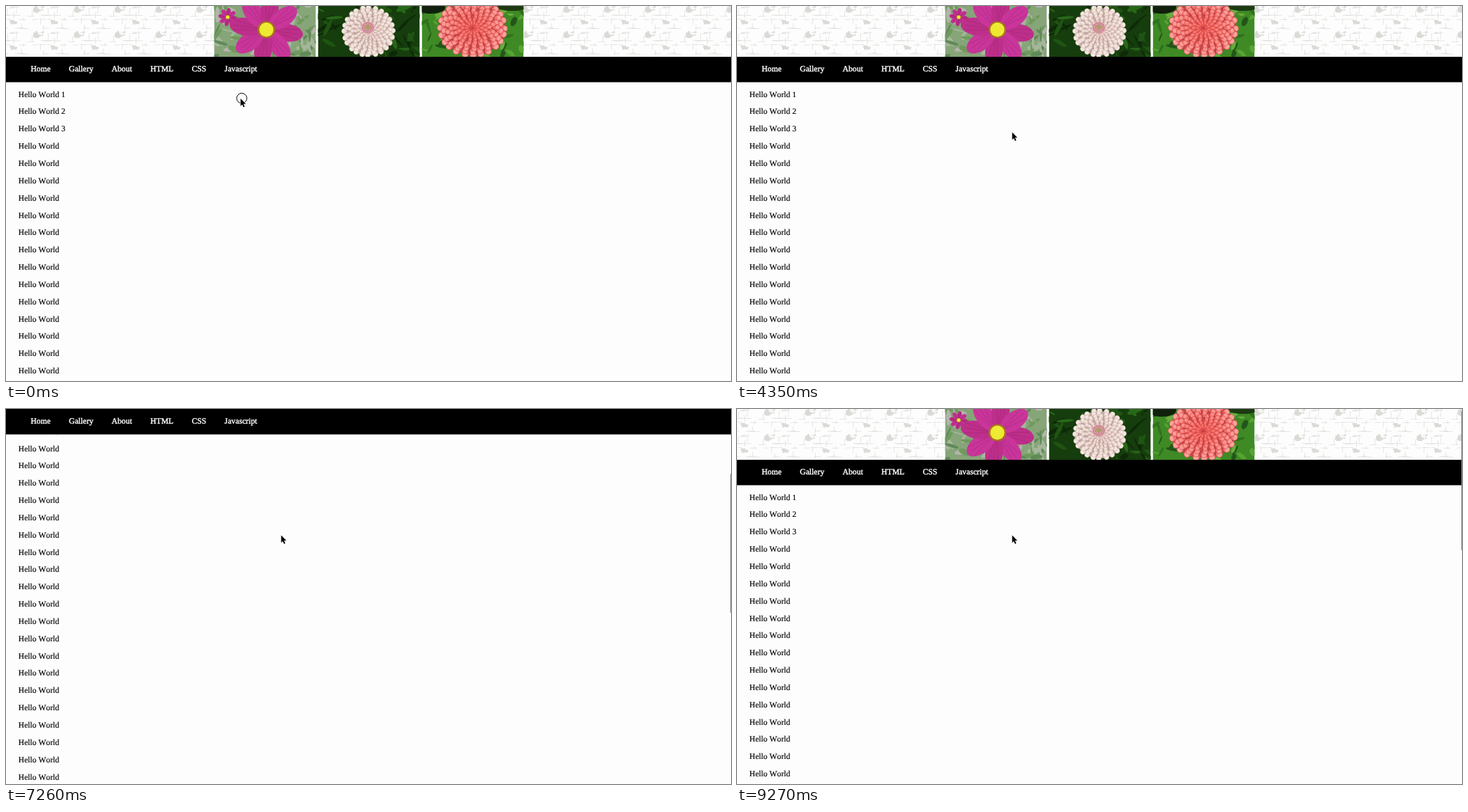
Recreate the animation shown at these times as an HTML page with a canvas. Size 1040 by 539 pixels, loop 9840 ms.

```html
<!DOCTYPE html>
<html lang="en">
<head>
<meta charset="utf-8">
<title>Sticky navigation</title>
<style>
html, body { margin: 0; width: 100%; height: 100%; overflow: hidden; background: #fdfdfd; }
body { position: relative; font: 11.7px "Liberation Serif", "Times New Roman", serif; font-kerning: none;
  text-rendering: geometricPrecision; -webkit-text-stroke: .15px; }
#page, #nav, #bar, #cursor, canvas { position: absolute; left: 0; }
canvas { top: 0; }
#page { top: 0; width: 1040px; }
#lines { position: absolute; top: 115.6px; left: 17.7px; line-height: 24.85px; white-space: nowrap; }
#lines div { height: 24.85px; }
#nav { box-sizing: border-box; width: 1040px; height: 37px; padding-left: 23.7px; color: #fff;
  background: linear-gradient(#000 36px, #0008 0); line-height: 36.5px; white-space: nowrap; -webkit-text-stroke: .4px; }
#nav a { display: inline-block; padding: 0 11.7px; height: 37px; vertical-align: top; }
#nav a.on { background: linear-gradient(#439a8a 36px, #439a8a88 0); }
#bar { left: 1038.6px; width: 2px; height: 200px; background: #858585; border-radius: 1px; }
#cursor { top: 0; pointer-events: none; }
</style>
</head>
<body>
<div id="page"><canvas id="head" width="1040" height="73"></canvas><div id="lines"></div></div>
<div id="nav"></div>
<div id="bar"></div>
<svg id="cursor" width="1040" height="539">
  <circle id="ring" cx="338.2" cy="132.6" r="7.3" fill="none" stroke="#000"/>
  <path id="arrow" d="M0 0V10.7L2.4 8.4L4.2 12.4L5.9 11.6L4.1 7.7H7.5Z" stroke="#fff" stroke-width="1.4" paint-order="stroke"/>
  <path id="hand" fill="#fff" stroke="#000" stroke-width=".9" d="M-1.3 7V1A1.2 1.2 0 0 1 1.1 1V4.8Q2.4 3.8 3.1 5Q4.4 4.4 5 5.6Q6.6 5 6.8 6.6V9Q6.6 10.5 5.8 11.5V12.8H.1V12Q-1.3 10.5-3.2 8Q-4 6.5-2.8 6.3Q-2 6.2-1.3 7.3ZM1.1 4.8V7M3.1 5V7M5 5.6V7"/>
</svg>
<script>
const $ = id => document.getElementById(id);
const LOOP = 9840, HEAD = 73;

let seed = 7;
const rnd = (a = 1, b = 0) => {
  seed = (seed * 16807) % 2147483647;
  return b + (a - b) * seed / 2147483647;
};

const c = $('head').getContext('2d');
function oval(x, y, rx, ry, fill, turn = 0) {
  c.fillStyle = fill;
  c.beginPath();
  c.ellipse(x, y, rx, ry, turn, 0, 7);
  c.fill();
}

// Brick wallpaper: two rough patches and broken mortar lines per tile
function wallpaper() {
  const parts = [];
  for (let i = 0; i < 14; i++) {
    parts.push([rnd(-6, 6), rnd(-4, 4), rnd(6, 2), rnd(4, 2), 47, 4.5]);
    if (i < 9) parts.push([rnd(-6, 6), rnd(-2.5, 2.5), rnd(5, 2), rnd(4, 2), 12, 23.5]);
  }
  const dashes = Array.from({ length: 26 }, (_, i) =>
    i % 3 ? [rnd(54), [1.5, 13.5, 19.5, 31.5][i % 4] + rnd(-1, 1), rnd(12, 4), .8]
          : [rnd(54), rnd(28), .8, rnd(9, 4)]);
  for (let x = -58.5; x < 1040; x += 58.5)
    for (let y = -36.5; y < HEAD; y += 36.5) {
      c.fillStyle = '#dadad6';
      for (const [dx, dy, w, h, ox, oy] of parts) c.fillRect(x + ox + dx - w / 2, y + oy + dy - h / 2, w, h);
      c.fillStyle = '#dededb';
      for (const [dx, dy, w, h] of dashes) c.fillRect(x + dx, y + dy, w, h);
    }
}

function photo(x, colors, leaves, draw) {
  c.save();
  c.beginPath();
  c.rect(x, 0, 146, HEAD);
  c.clip();
  c.fillStyle = colors[0];
  c.fillRect(x, 0, 146, HEAD);
  for (let i = 0; i < leaves; i++)
    oval(x + rnd(146), rnd(HEAD), rnd(14, 4), rnd(4, 1), colors[i % colors.length], rnd(6.3));
  draw();
  c.restore();
}

function cosmos(x, y, r) {
  for (let i = 0; i < 8; i++) {
    const a = i * Math.PI / 4 + .15, px = Math.cos(a), py = Math.sin(a);
    oval(x + px * r * .58, y + py * r * .56, r * .46, r * .25, i % 2 ? '#c9359a' : '#bd2f8a', a);
    c.strokeStyle = '#96246c77';
    for (let k = -1; k < 2; k++) {
      c.beginPath();
      c.moveTo(x, y);
      c.lineTo(x + Math.cos(a + k * .16) * r * .92, y + Math.sin(a + k * .16) * r * .9);
      c.stroke();
    }
  }
  oval(x, y, r * .25, r * .24, '#a8701f');
  oval(x, y, r * .2, r * .2, '#eeea32');
}

// Rings of petals from the rim inwards, each with a shaded base and a bright tip
function dahlia(x, y, rx, ry, rings, shade, body, tip) {
  for (let i = 0; i < rings; i++) {
    const k = 1 - i / rings, n = Math.round(11 + 13 * k);
    for (let j = 0; j < n; j++) {
      const a = (j + i % 2 / 2 + rnd(-.15, .15)) * 2 * Math.PI / n, d = k * .89;
      const dx = Math.cos(a), dy = Math.sin(a);
      const px = x + dx * rx * d, py = y + dy * ry * d;
      const w = rx * .12, h = rx * (.03 + k * .085);
      oval(px, py, w, h, shade, a);
      oval(px + dx, py + dy, w * .85, h * .8, body(k), a);
      oval(px + dx * w * .45, py + dy * w * .45, w * .4, h * .6, tip(k), a);
    }
  }
}

wallpaper();
c.fillStyle = '#fff';
c.fillRect(298, 0, 445, HEAD);
photo(298.5, ['#86a578', '#6f9a5d', '#a5b69b', '#5f8a58', '#b3b4ac'], 110, () => {
  cosmos(318, 16, 13);
  cosmos(373.5, 34, 51);
});
photo(447.5, ['#163d0d', '#1f5412', '#0d2a08', '#286819'], 70, () => {
  oval(520, 37, 36, 34, '#c9b3ab');
  dahlia(520, 36.5, 38, 37, 8, '#b79c94', k => `hsl(${16 * k + 5} 38% ${80 + 6 * k}%)`, k => `hsl(15 45% ${87 + 6 * k}%)`);
  oval(519, 31, 9, 8, '#d795a0');
  dahlia(519, 31, 9, 8, 3, '#b9707f', () => '#e0a5ab', () => '#eec3c0');
  oval(519, 30.5, 3.5, 3, '#a9a060');
});
photo(596.5, ['#3f8a25', '#2f711c', '#57a334', '#22551a', '#67ad3d'], 70, () => {
  oval(610, 2, 20, 9, '#10200c');
  oval(726, 0, 24, 7, '#1c3a12');
  oval(669, 32, 46, 38, '#cf4f4f');
  dahlia(669, 31.5, 50, 42, 8, '#bd3d43', k => `hsl(2 82% ${62 + 8 * k}%)`, k => `hsl(4 90% ${68 + 12 * k}%)`);
});

$('lines').innerHTML = Array.from({ length: 50 }, (_, i) => `<div>Hello World ${i < 3 ? i + 1 : ''}</div>`).join('');
$('nav').innerHTML = ['Home', 'Gallery', 'About', 'HTML', 'CSS', 'Javascript'].map(s => `<a>${s}</a>`).join(' ');
const links = [...document.querySelectorAll('#nav a')];

// Pointer path: time, x, y
const path = [[0, 336.5, 133], [900, 336.5, 133], [1550, 338.2, 100.5], [1960, 338.2, 100.5],
  [2480, 276, 99], [2750, 276, 99], [3350, 315, 98], [3820, 390, 99], [4180, 390, 99],
  [4350, 394.7, 181.5], [LOOP, 394.7, 181.5]];

// Scroll position jumps at each time
const scrolls = [[0, 0], [5010, 4], [5070, 10], [5250, 25.5], [5420, 43], [5600, 60], [5780, 76], [5960, 93],
  [6140, 112], [6310, 132.3], [6490, 152], [6700, 176], [6880, 201], [7080, 225], [7260, 244], [7440, 254],
  [7790, 247], [7970, 231], [8150, 209.8], [8330, 186], [8510, 157], [8710, 118], [8920, 62], [9090, 22], [9270, 0]];

function pointer(t) {
  const i = path.findIndex(p => p[0] > t), [t0, x0, y0] = path[i - 1], [t1, x1, y1] = path[i];
  const k = (t - t0) / (t1 - t0);
  return [x0 + (x1 - x0) * k, y0 + (y1 - y0) * k];
}

function frame(now) {
  const t = now % LOOP, [x, y] = pointer(t);
  const scroll = scrolls.filter(s => s[0] <= t).pop()[1];
  $('page').style.top = -scroll + 'px';
  $('nav').style.top = Math.max(0, HEAD - scroll) + 'px';
  $('bar').style.top = 2.7 + scroll * .371 + 'px';
  $('bar').style.display = t < 5010 ? 'none' : '';

  let over = false;
  for (const a of links) {
    const r = a.getBoundingClientRect();
    const hit = x >= r.left && x < r.right && y >= r.top && y < r.bottom;
    a.className = hit ? 'on' : '';
    over ||= hit;
  }
  $('ring').style.display = t < 60 ? '' : 'none';
  for (const id of ['arrow', 'hand']) {
    $(id).setAttribute('transform', `translate(${x} ${y})`);
    $(id).style.display = over === (id === 'hand') ? '' : 'none';
  }
}

const start = performance.now();
(function tick() {
  frame(performance.now() - start);
  requestAnimationFrame(tick);
})();
</script>
</body>
</html>
```
